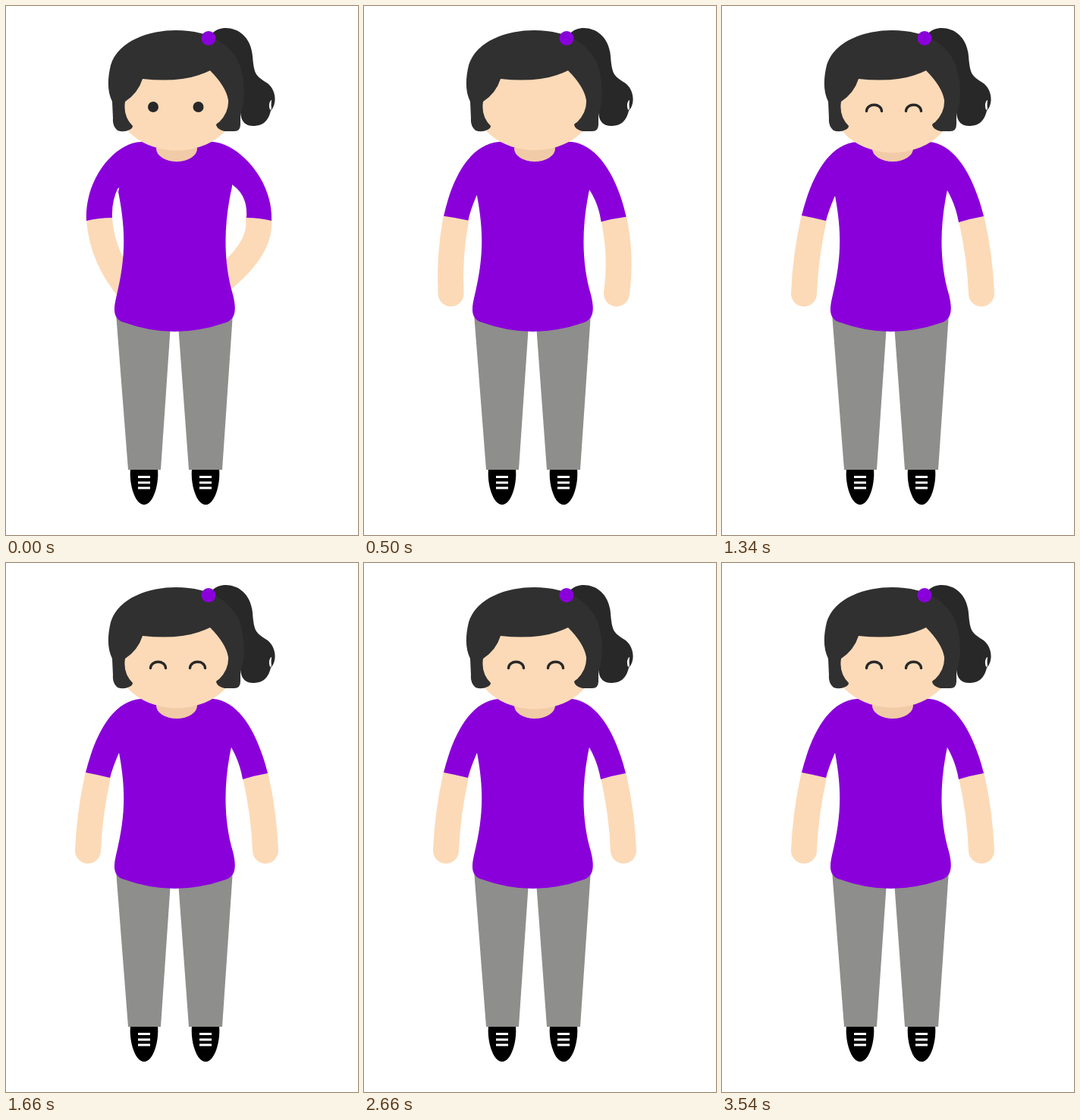
Animation, 464 px wide and 697 px high, one loop 3.56 s. Source, as an HTML page:

```html
<!DOCTYPE html>
<html lang="en">
<head>
<meta charset="utf-8">
<title>Girl relaxing her arms</title>
<style>
  html, body { margin: 0; width: 100%; height: 100%; overflow: hidden; background: #fff; }
  svg { display: block; width: 100%; height: 100%; }
  .shirt { fill: #8a00da; }
  .skin { fill: #fcdab7; }
  .hair { fill: #303030; }
  .dark { fill: #282828; }
  .trousers { fill: #8e8e8c; }
  .forearm { fill: none; stroke: #fcdab7; stroke-width: 34; stroke-linecap: round; }
  .smile { fill: none; stroke: #282828; stroke-width: 3.4; stroke-linecap: round; }
</style>
</head>
<body>
<svg viewBox="0 0 464 697">
  <defs>
    <g id="shoe">
      <path d="M164 610H200C202 630 194 657 182 657C170 657 162 630 164 610Z"/>
      <path d="M174 620.500H190M174 628H190M174 635H190" stroke="#fff" stroke-width="3"/>
    </g>
  </defs>

  <use href="#shoe"/>
  <use href="#shoe" x="81"/>
  <path class="trousers" d="M145 405L161 611H204L217 420ZM227 420L241 611H285L299 405Z"/>

  <path class="forearm"/>
  <path class="forearm"/>
  <path class="shirt sleeve"/>
  <path class="shirt sleeve"/>
  <path class="shirt" d="M178 179H273L298 192V238C286 290 287 340 299 380C304 400 303 412 290 417Q222 441 156 417C142 413 141 402 145 385C157 335 159 300 148 245L160 190Z"/>
  <ellipse cx="225" cy="188" rx="27" ry="17" fill="#f1cba7"/>

  <ellipse id="face" class="skin" cx="225" rx="80" ry="64"/>
  <path class="dark" d="M265 45L272 36C285 22 322 28 325 66C327 92 330 92 345 102C357 112 357 130 349 138C345 155 335 158 326 158Q310 158 309 140L290 60Z"/>
  <path fill="#fff" d="M349.500 124Q345 128 348 137L350 136Q349 130 350 124Z"/>
  <path class="hair" d="M157 126Q154 145 167 158Q167 161 163 163Q155 167 147 164Q140 158 141 148L140 126C133 112 134 95 138 78C148 45 190 32 224 32C268 32 298 50 309 80C316 105 315 130 309 142V156Q309 165 301 165H288Q279 163 277 157Q277 155 281 153Q294 140 293 124Q290 106 269 85Q235 102 180 96Q174 115 157 126Z"/>
  <circle class="shirt" cx="267" cy="42.500" r="9.500"/>

  <g id="dots" class="dark">
    <circle cx="194" cy="133" r="7"/>
    <circle cx="253.500" cy="133" r="7"/>
  </g>
  <path id="smiles" class="smile" d="M190.500 138.500C191 127.500 210 127.500 210.500 138.500M242.500 138.500C243 127.500 262 127.500 262.500 138.500"/>
</svg>

<script>
const LOOP = 3560, ARMS_DOWN = 565, BOB = LOOP / 2;

// Each pair holds the pose on the hips and the pose at rest, left then right.
const forearmPoses = [
  ['M123 281Q127 334 166 378', 'M121 281Q110 330 108 379'],
  ['M333 281Q338 326 262 378', 'M329 281Q340 330 342 379']
];
const sleevePoses = [
  ['M178 179C143 180 103 229 106 283Q123 279 140 279Q139 258 147 241L200 200Z',
   'M178 179C140 182 118 225 105 276Q121 279 137 283Q141 268 149 250L200 200Z'],
  ['M273 179C304 181 352 226 350 283Q334 279 317 279Q319 250 299 236L250 200Z',
   'M273 179C308 182 332 225 345 277Q328 280 312 285Q308 262 297 243L250 200Z']
];

const forearms = document.querySelectorAll('.forearm');
const sleeves = document.querySelectorAll('.sleeve');
const face = document.getElementById('face');
const dots = document.getElementById('dots');
const smiles = document.getElementById('smiles');

const progress = (t, from, to) => Math.min(1, Math.max(0, (t - from) / (to - from)));

function mixPath([a, b], p) {
  const ends = b.match(/\d+/g);
  let i = 0;
  return a.replace(/\d+/g, n => (+n + (ends[i++] - n) * p).toFixed(2));
}

function draw(t) {
  const p = progress(t, 0, ARMS_DOWN);
  forearms.forEach((el, i) => el.setAttribute('d', mixPath(forearmPoses[i], p)));
  sleeves.forEach((el, i) => el.setAttribute('d', mixPath(sleevePoses[i], p)));
  face.setAttribute('cy', 127.5 + 2 * Math.cos(2 * Math.PI * (t - 1180) / BOB));
  dots.setAttribute('opacity', 1 - progress(t, 20, 400));
  smiles.setAttribute('opacity', progress(t, 560, 760));
}

const start = performance.now();
function tick() {
  draw((performance.now() - start) % LOOP);
  requestAnimationFrame(tick);
}
tick();
</script>
</body>
</html>
```
